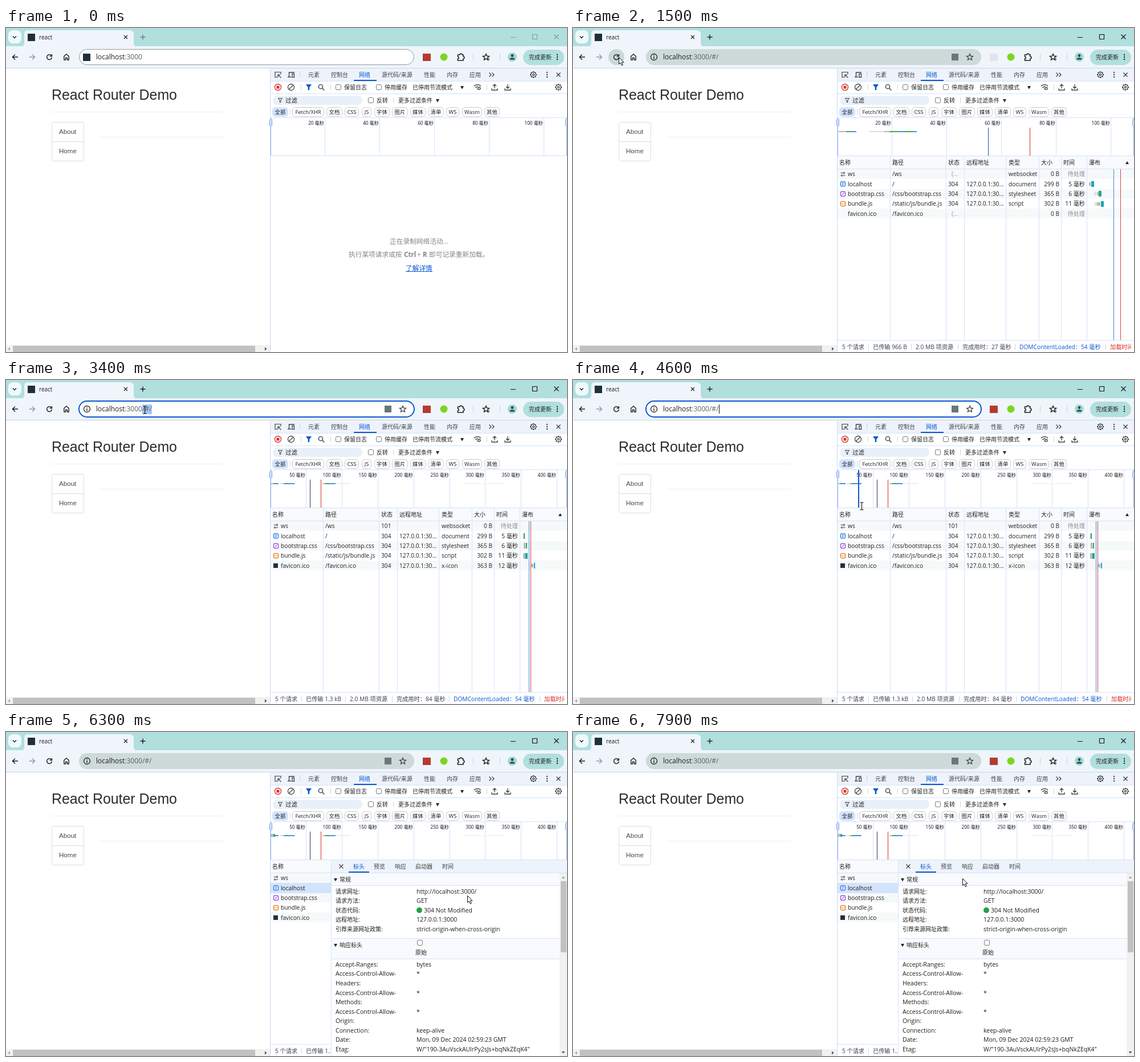
Write an HTML page with a canvas that moves like this. It is 984 px wide and 569 px high and loops after 8 s.

```html
<!DOCTYPE html>
<html lang="zh">
<head>
<meta charset="utf-8">
<style>
html, body { margin: 0; width: 100%; height: 100%; overflow: hidden; background: #fff; }
canvas { display: block; }
</style>
</head>
<body>
<canvas id="stage" width="984" height="569"></canvas>
<script>
const g = document.getElementById('stage').getContext('2d');
const UI = '"Open Sans", "Noto Sans CJK SC", sans-serif';
const INK = '#1f1f1f', ICON = '#3c4043', BLUE = '#0b57d0', GRID = '#d3e3fd', BAR = '#eff5fb', TEAL = '#b1dfdd', MARK = '#20303a';
const LOOP = 8000, STEP = 100;

function rect(x, y, w, h, color) { g.fillStyle = color; g.fillRect(x, y, w, h); }

function round(x, y, w, h, r, fill, stroke, lw = 1) {
  g.beginPath();
  g.roundRect(x, y, w, h, r);
  paint(fill, stroke, lw);
}

function circle(x, y, r, fill, stroke, lw = 1) {
  g.beginPath();
  g.arc(x, y, r, 0, 7);
  paint(fill, stroke, lw);
}

function paint(fill, stroke, lw) {
  if (fill) { g.fillStyle = fill; g.fill(); }
  if (stroke) { g.strokeStyle = stroke; g.lineWidth = lw; g.stroke(); }
}

// Text centred vertically on cy, with a whole-pixel baseline; returns its width.
function text(s, x, cy, size = 10, color = INK, { align = 'left', weight = 400, font = UI } = {}) {
  g.font = `${weight} ${size}px ${font}`;
  g.textAlign = align;
  g.fillStyle = color;
  g.fillText(s, x, Math.round(cy + size * 0.37));
  return g.measureText(s).width;
}

// SVG path drawn around (x, y).
function icon(d, x, y, stroke = ICON, lw = 1.3, fill) {
  const path = new Path2D(d);
  g.save();
  g.translate(x, y);
  g.lineWidth = lw;
  g.strokeStyle = stroke;
  g.fillStyle = fill;
  if (fill) g.fill(path);
  if (stroke) g.stroke(path);
  g.restore();
}

const CROSS = 'M-3.5-3.5L3.5 3.5M3.5-3.5L-3.5 3.5';
const FUNNEL = 'M-5-5H5L1.3 0V5H-1.3V0Z';
const STAR = 'M0-5.5L1.6-1.8L5.5-1.5L2.5 1.1L3.5 5L0 2.9L-3.5 5L-2.5 1.1L-5.5-1.5L-1.6-1.8Z';
const down = (x, y, s = 3, color = INK) => icon(`M${-s}${-s}H${s}L0 ${s * 0.8}Z`, x, y, null, 1, color);
const checkbox = (x, y) => round(x - 4.5, y - 4.5, 9, 9, 2, '#fff', '#767676');
const divider = (x, cy, h = 10) => rect(x, cy - h / 2, 1, h, '#c9d6e8');
const dots = (x, cy, color = ICON) => [-4, 0, 4].forEach(d => circle(x, cy + d, 1.2, color));

function gear(x, y) {
  circle(x, y, 4.4, null, ICON, 1.3);
  circle(x, y, 1.6, null, ICON, 1.2);
  for (let i = 0; i < 8; i++) {
    const c = Math.cos(i * Math.PI / 4), s = Math.sin(i * Math.PI / 4);
    icon(`M${c * 4.5} ${s * 4.5}L${c * 6} ${s * 6}`, x, y, ICON, 1.8);
  }
}

function drawBrowser(t) {
  const active = t >= 1300, reloaded = t >= 1400;
  const focused = (t >= 1300 && t < 1400) || (t >= 2800 && t < 5000);
  const ctrl = active ? '#111' : '#7e9c9c';

  rect(0, 0, 984, 33, TEAL);
  rect(0, 32, 984, 38, BAR);
  rect(0, 70, 984, 1, '#c8d8e4');
  round(4, 4, 23, 23, 8, '#f0f9fa');
  icon('M-3-1.5L0 1.5L3-1.5', 15, 16, INK, 1.5);
  icon('M25 33Q32 33 32 26V11Q32 4 39 4H217Q224 4 224 11V26Q224 33 231 33Z', 0, 0, null, 1, BAR);
  rect(38, 10, 13, 13, MARK);
  text('react', 58, 16);
  icon('M-3-3L3 3M3-3L-3 3', 210, 16, INK, 1.2);
  icon('M-4.5 0H4.5M0-4.5V4.5', 240, 16, active ? INK : '#66807f', 1.4);
  icon('M885 16.5H894M923.5 11.5H931.5V19.5H923.5ZM961.5 11.5L969.5 19.5M969.5 11.5L961.5 19.5', 0, 0, ctrl, 1.1);

  if (t >= 900 && t < 2000) circle(76, 51, 14, reloaded ? '#c9d8da' : '#dde9eb');
  icon('M5 0H-4M0-4.5L-4.5 0L0 4.5', 16, 51, INK, 1.5);
  icon('M-5 0H4M0-4.5L4.5 0L0 4.5', 46, 51, '#8c9a9d', 1.4);
  icon('M3.2-3A4.4 4.4 0 1 0 4.4.6M4.4-5V-1.5H.8', 76, 51, INK, 1.5);
  icon('M-4.2 5V-1.5L0-5L4.2-1.5V5H1.4V1.5H-1.4V5Z', 106, 51, INK, 1.4);

  if (focused) round(128, 37, 588, 28, 14, '#fff', BLUE, 2);
  else if (reloaded) round(128, 37, 588, 28, 14, '#ced9d9');
  else round(128.5, 37.5, 587, 27, 13.5, '#fff', '#8f9c9f');

  if (reloaded) {
    circle(142, 51, 5.5, null, INK, 1.3);
    rect(141.3, 50.3, 1.4, 4, INK);
    rect(141.3, 47.8, 1.4, 1.4, INK);
    rect(664, 45, 12, 12, '#68777a');
    icon(STAR, 696, 51, ICON, 1.3);
  } else rect(135, 45, 13, 13, MARK);

  const selecting = t >= 3000 && t < 4200;
  if (selecting) {
    const left = t < 3100 ? 251 : t < 3400 ? 243 : 239;
    rect(left, 43, 256 - left, 17, '#a8c7fa');
  }
  const host = text('localhost', 158, 51, 12);
  text(reloaded ? ':3000/#/' : ':3000', 158 + host, 51, 12, '#5a6366');
  if (focused && !selecting) rect(reloaded ? 256 : 239, 43, 1, 16, '#111');

  rect(731, 45, 14, 13, t >= 1400 && t < 1700 ? '#dfe5ea' : '#b63a31');
  circle(768, 51, 6.5, '#7fd321');
  icon('M-5.5-4H-2A2 2 0 0 1 2-4H4V-1A2 2 0 0 1 4 3V6H-5.5V2.8A1.8 1.8 0 0 0-5.5-.8Z', 798, 51, INK, 1.5);
  divider(819, 51, 12);
  icon(STAR, 842, 51, INK, 1.4);
  icon('M2 5H6M4 2.5H6', 842, 51, INK, 1.2);
  divider(866, 51, 12);
  circle(888, 51, 8, '#a9d5d5');
  circle(888, 48.5, 2.4, '#174f55');
  icon('M-4.5 4.5Q-4.5 1.2 0 1.2T4.5 4.5Z', 888, 51, null, 1, '#174f55');
  round(907, 38, 72, 27, 13.5, TEAL);
  text('完成更新', 917, 51.5, 10, INK, { weight: 500 });
  dots(967, 51, INK);
}

function drawPage() {
  const arial = { font: '"Liberation Sans", Arial, sans-serif' };
  rect(0, 71, 463, 498, '#fff');
  text('React Router Demo', 80, 117, 24.9, '#2b2b2b', arial);
  rect(80, 147, 301, 1, '#eee');
  rect(164, 191, 217, 1, '#eee');
  round(80.5, 165.5, 56, 68, 3, '#fff', '#ddd');
  rect(80, 199, 57, 1, '#ddd');
  text('About', 93, 182, 11.6, '#4a4a4a', arial);
  text('Home', 93, 216, 11.6, '#4a4a4a', arial);
  rect(0, 557, 463, 12, '#f1f1f1');
  rect(12, 558, 425, 11, '#c1c1c1');
  icon('M2-3V3L-1.5 0Z', 5, 563.5, null, 1, '#a3a3a3');
  icon('M-2-3V3L1.5 0Z', 456, 563.5, null, 1, '#505050');
}

function drawToolbars() {
  rect(463, 71, 521, 498, '#fff');
  rect(463, 71, 521, 22, '#eef3fb');
  for (const y of [93, 115, 157]) rect(463, y, 521, 1, GRID);

  icon('M5-1V-4.5H-5V4.5H-1M0 0L5.5 5.5M0 4.5V0H4.5', 477, 82, ICON, 1.2);
  icon('M-3.5 3V-4H6M-6 4H0M2-1.5H5.5V4.5H2Z', 500, 82, ICON, 1.3);
  divider(515, 82, 12);
  [['元素', 530], ['控制台', 570], ['网络', 619], ['源代码/来源', 659], ['性能', 733], ['内存', 773], ['应用', 813]]
    .forEach(([s, x]) => text(s, x, 82, 10, s === '网络' ? BLUE : ICON));
  rect(610, 91, 40, 2, BLUE);
  icon('M-4.5-3.5L-1 0L-4.5 3.5M.5-3.5L4 0L.5 3.5', 852, 82);
  gear(925, 82);
  dots(949, 82);
  icon(CROSS, 969, 82, ICON, 1.4);

  circle(477, 104, 5.5, null, '#dc362e', 1.4);
  rect(474.5, 101.5, 5, 5, '#dc362e');
  circle(500, 104, 5.5, null, ICON, 1.3);
  icon('M-4 4L4-4', 500, 104);
  icon(FUNNEL, 531, 104, null, 1, BLUE);
  circle(552, 103, 3.6, null, ICON, 1.4);
  icon('M2.5 2.5L6.5 6.5', 552, 103, ICON, 1.5);
  [517, 569, 843].forEach(x => divider(x, 104));
  checkbox(583, 104);
  text('保留日志', 593, 104.5);
  checkbox(654, 104);
  text('停用缓存', 664, 104.5);
  text('已停用节流模式', 713, 104.5);
  down(800, 105);
  icon('M-6-2Q0-7 6-2M-3.5 1Q-1-1.5 1-.8M-1 3L0 4', 827, 104, ICON, 1.4);
  circle(830, 106, 2, null, ICON, 1.3);
  icon('M0 2V-5M-3-2L0-5L3-2M-5 2V5H5V2', 857, 104);
  icon('M0-5V2M-3-1L0 2L3-1M-5 2V5H5V2', 880, 104);
  gear(969, 104);

  round(468, 119, 157, 16, 8, '#e9f0fa');
  icon('M-3.5-3.5H3.5L.8 0V3.5H-.8V0Z', 481, 127, ICON, 1);
  text('过滤', 490, 127.5, 10.5);
  checkbox(640, 127);
  text('反转', 650, 127.5);
  divider(679, 127);
  text('更多过滤条件', 688, 127.5);
  down(757, 128);

  const chips = [['全部', 467, 495], ['Fetch/XHR', 502, 558], ['文档', 562, 590], ['CSS', 594, 619], ['JS', 624, 641],
    ['字体', 646, 673], ['图片', 677, 705], ['媒体', 709, 736], ['清单', 740, 768], ['WS', 772, 795], ['Wasm', 800, 835], ['其他', 839, 866]];
  chips.forEach(([s, a, b], i) => {
    round(a + .5, 139.5, b - a - 1, 16, 5, i ? '#fff' : GRID, i ? '#c4c9d0' : GRID);
    text(s, (a + b) / 2, 147.5, 9.4, INK, { align: 'center' });
  });
  divider(498, 147);
}

const GREY = '#b9b9b9', PALE = '#e2e2e2', GREEN = '#34b04a', SKY = '#4a8df0', RED = '#d93025', NAVY = '#1a4fb4';

// Consecutive coloured bars: start, then [end, colour] pairs.
function bars(y, h, x, ...parts) {
  for (const [end, color] of parts) { rect(x, y, end - x, h, color); x = end; }
}

function drawOverview(t, phase, mouse) {
  const late = phase === 2, gap = late ? 62.9 : 96, unit = late ? 50 : 20;
  for (let k = 1; 464 + gap * k < 984; k++) {
    const x = Math.floor(463.5 + gap * k);
    rect(x, 158, 1, 66, GRID);
    text(`${unit * k} 毫秒`, x - 1, 167, 8.2, '#111', { align: 'right' });
  }
  if (phase === 1) {
    bars(181, 2, 466, [479, GREY], [488, GREEN], [497, SKY]);
    bars(181, 2, 519, [545, PALE], [555, GREY], [571, GREEN], [581, SKY], [594, GREEN], [603, SKY]);
    rect(728, 175, 1, 49, NAVY);
    rect(801, 175, 1, 49, RED);
  }
  if (late) {
    bars(181, 2, 465, [469, GREY], [472, GREEN], [478, SKY]);
    bars(181, 2, 480, [485, PALE], [488, GREY], [492, GREEN], [506, SKY]);
    bars(181, 2, 555, [560, GREY], [567, GREEN], [578, SKY], [604, '#f0f0f0']);
    rect(804, 181, 72, 2, '#f5f5f5');
    rect(533, 175, 1, 49, '#333064');
    rect(552, 175, 1, 49, RED);
    if (t >= 5100) bars(179, 5, 465, [469, GREY], [472, '#2fa38b']);
  }
  if (mouse && mouse[1] > 158 && mouse[1] < 224) rect(mouse[0] - 6, 158, 2, 66, BLUE);
  rect(464, 158, 1, 66, '#8ab0f0');
  rect(983, 158, 1, 66, '#8ab0f0');
  round(462.5, 159.5, 4, 13, 2, GRID, '#7aa7ee');
  round(981.5, 159.5, 4, 13, 2, GRID, '#7aa7ee');
  rect(463, 224, 521, 1, GRID);
}

function drawEmpty() {
  const grey = '#80868b';
  text('正在录制网络活动...', 673, 375, 11.7, grey);
  text('执行某项请求或按', 601, 398, 11.7, grey);
  text('Ctrl', 698, 398, 11.7, grey, { weight: 700 });
  text('+', 721, 398, 11.7, grey);
  text('R', 731, 398, 11.7, grey, { weight: 700 });
  text('即可记录重新加载。', 742, 398, 11.7, grey);
  text('了解详情', 701, 421.5, 11.7, BLUE);
  rect(701, 427, 47, 1, BLUE);
}

const rowY = i => 256.5 + 17.4 * i;

function drawTable(phase, open) {
  const late = phase === 2, right = open ? 570 : 984, pending = '#8a8f94';
  rect(464, 225, right - 464, 22, '#f8fafd');
  for (let i = 0; i < 5; i += 2) rect(464, Math.round(rowY(i) - 8.7), right - 464, 17, '#f6f9fa');
  if (open) rect(464, 265, 106, 18, GRID);
  rect(463, 247, right - 463, 1, GRID);

  text('名称', 467, 236);
  ['ws', 'localhost', 'bootstrap.css', 'bundle.js', 'favicon.ico'].forEach((s, i) => text(s, 482, rowY(i), 10.2));
  icon('M-4-2H3M1-4L3.5-2L1 0M4 2.5H-3M-1 .5L-3.5 2.5L-1 4.5', 473.5, 256.5, ICON, 1);
  ['#1a73e8', '#9334e6', '#e8710a'].forEach((c, i) => round(469.5, rowY(i + 1) - 4, 8, 8, 1.5, '#fff', c, 1.2));
  icon('M-2-1.5H2M-2 .5H2M-2 2.3H1', 473.5, 273.5, '#1a73e8', .9);
  icon('M-2 2L2-2', 473.5, 291.3, '#9334e6', 1.1);
  icon('M-.8-1.8L-2.4 0L-.8 1.8M.8-1.8L2.4 0L.8 1.8', 473.5, 308.7, '#e8710a', 1);
  if (late) rect(469, 322, 8, 8, MARK);

  if (!open) {
    [['路径', 560], ['状态', 658], ['远程地址', 690], ['类型', 764], ['大小', 821], ['时间', 860], ['瀑布', 905]]
      .forEach(([s, x]) => text(s, x, 236));
    icon('M-3 2.5H3L0-2.5Z', 972, 236.5, null, 1, INK);
    const rows = [
      ['/ws', late && '101', '', 'websocket', '0 B'],
      ['/', '304', '127.0.0.1:30...', 'document', '299 B', '5 毫秒'],
      ['/css/bootstrap.css', '304', '127.0.0.1:30...', 'stylesheet', '365 B', '6 毫秒'],
      ['/static/js/bundle.js', '304', '127.0.0.1:30...', 'script', '302 B', '11 毫秒'],
      late ? ['/favicon.ico', '304', '127.0.0.1:30...', 'x-icon', '363 B', '12 毫秒'] : ['/favicon.ico', '', '', '', '0 B'],
    ];
    rows.forEach(([path, status, address, type, size, time], i) => {
      const y = rowY(i);
      text(path, 560, y, 10.2);
      status ? text(status, 658, y, 10.2) : text('(...', 664, y, 10.2, pending);
      text(address, 690, y, 10.2);
      text(type, 764, y, 10.2);
      text(size, 853, y, 10.2, INK, { align: 'right' });
      text(time || '待处理', 898, y, 10.2, time ? INK : pending, { align: 'right' });
    });
    [556, 654, 686, 759, 817, 856, 901].forEach(x => rect(x, 225, 1, 323, GRID));

    const cyan = '#12a5d6', jade = '#26ab6c';
    if (late) {
      bars(269, 10, 906, [908, PALE], [910, jade]);
      bars(286, 10, 908, [911, GREY], [912, PALE], [914, jade]);
      bars(304, 10, 907, [911, GREY], [913, jade], [915, cyan]);
      bars(323, 6, 921, [925, GREY]);
      bars(321, 10, 926, [928, cyan]);
    } else {
      bars(271, 6, 905, [908, GREY]);
      bars(269, 10, 909, [911, jade], [914, cyan]);
      bars(288, 6, 914, [920, PALE], [922, GREY]);
      bars(286, 10, 922, [925, jade], [927, cyan]);
      bars(306, 6, 914, [919, PALE], [925, GREY]);
      bars(304, 10, 926, [928, jade], [931, cyan]);
    }
    rect(late ? 917 : 948, 248, 1, 300, '#4a80d4');
    rect(late ? 920 : 960, 248, 1, 300, '#d2453f');
  }

  // Summary bar, clipped to the visible width.
  const shift = late ? 2 : 0;
  g.save();
  g.beginPath();
  g.rect(463, 548, (open ? 569 : 979) - 463, 21);
  g.clip();
  rect(463, 548, 521, 21, '#fff');
  rect(463, 548, 521, 1, GRID);
  [['5 个请求', 472], [`已传输 ${late ? '1.3 kB' : '966 B'}`, 526], ['2.0 MB 项资源', 601 + shift],
    [`完成用时：${late ? 84 : 27} 毫秒`, 683 + shift], ['DOMContentLoaded：54 毫秒', 783 + shift, BLUE], ['加载时间：', 942 + shift, RED]]
    .forEach(([s, x, color = ICON], i) => {
      text(s, x, 560, 10.2, color);
      if (i) divider(x - 8, 560);
    });
  g.restore();
  if (!open) rect(979, 548, 5, 1, GRID);
}

function drawDetails() {
  rect(570, 225, 414, 344, '#fff');
  rect(570, 225, 1, 344, GRID);
  rect(571, 225, 413, 22, '#eef3fb');
  rect(571, 247, 413, 1, GRID);
  icon(CROSS, 588, 236, ICON, 1.3);
  [['标头', 609], ['预览', 645], ['响应', 682], ['启动器', 718], ['时间', 765]]
    .forEach(([s, x], i) => text(s, x, 236, 10, i ? ICON : BLUE));
  rect(601, 245, 36, 2, BLUE);

  rect(571, 248, 400, 21, '#f8fafd');
  rect(571, 363, 400, 35, '#f8fafd');
  for (const y of [269, 362, 398]) rect(571, y, 400, 1, GRID);
  down(578, 260);
  text('常规', 585, 259);
  down(578, 375);
  text('响应标头', 585, 374);
  checkbox(726, 370);
  text('原始', 718, 387);

  [['请求网址:', 'http://localhost:3000/'], ['请求方法:', 'GET'], ['状态代码:', '304 Not Modified'],
    ['远程地址:', '127.0.0.1:3000'], ['引荐来源网址政策:', 'strict-origin-when-cross-origin']].forEach(([key, value], i) => {
    const y = 280 + 16.5 * i;
    text(key, 578, y);
    text(value, i === 2 ? 733 : 720, y, 10.5);
  });
  circle(725, 313, 5, '#1ea446');

  [['Accept-Ranges:', 'bytes'], ['Access-Control-Allow-', '*'], ['Headers:'], ['Access-Control-Allow-', '*'], ['Methods:'],
    ['Access-Control-Allow-', '*'], ['Origin:'], ['Connection:', 'keep-alive'], ['Date:', 'Mon, 09 Dec 2024 02:59:23 GMT'],
    ['Etag:', 'W/"190-3AuVsckAUlrPy2sJs+bqNkZEqK4"']].forEach(([key, value = ''], i) => {
    const y = 408 + 16.57 * i;
    text(key, 578, y, 10.6);
    text(value, 720, y, 10.5);
  });

  rect(971, 248, 13, 321, '#f1f1f1');
  rect(973, 262, 10, 125, '#c1c1c1');
  icon('M-3 2H3L0-1.5Z', 977.5, 255, null, 1, '#a3a3a3');
  icon('M-3-2H3L0 1.5Z', 977.5, 563, null, 1, '#505050');
}

// Pointer way-points: time, x, y.
const PATH = [[100, 900, 52], [500, 330, 55], [900, 80, 51], [1800, 80, 51], [2000, 121, 78], [2100, 185, 98], [2200, 240, 104],
  [2300, 289, 94], [2400, 287, 78], [2500, 282, 58], [2600, 270, 52], [3000, 248, 52], [3200, 244, 52], [3500, 242, 52],
  [3700, 242, 52], [4000, 300, 52], [4300, 300, 52], [4400, 322, 75], [4600, 506, 221], [4900, 498, 271], [5400, 498, 271],
  [6300, 809, 287], [6700, 827, 283], [6800, 827, 283], [7700, 737, 280], [7900, 683, 257]];

function pointerAt(t) {
  if (t < PATH[0][0]) return null;
  const i = PATH.findIndex(p => p[0] > t);
  if (i < 0) return PATH[PATH.length - 1].slice(1);
  const [t0, x0, y0] = PATH[i - 1], [t1, x1, y1] = PATH[i];
  const k = (t - t0) / (t1 - t0);
  return [Math.round(x0 + (x1 - x0) * k), Math.round(y0 + (y1 - y0) * k)];
}

function drawPointer([x, y]) {
  const inAddress = x > 150 && x < 655 && y > 38 && y < 66;
  const inOverview = x > 463 && y > 158 && y < 224;
  if (inAddress || inOverview) icon('M-3-6.5H-1L0-5.5L1-6.5H3M0-5.5V5.5M-3 6.5H-1L0 5.5L1 6.5H3', x + .5, y + .5, '#111', 1.1);
  else icon('M.5.5V12.5L3.2 10L5.3 14.8L7.3 13.9L5.3 9.2H9Z', x, y, '#111', 1, '#fff');
}

function render(t) {
  const phase = t < 1500 ? 0 : t < 1800 ? 1 : 2;
  const open = t >= 5100;
  const mouse = pointerAt(t);
  drawBrowser(t);
  drawPage();
  drawToolbars();
  drawOverview(t, phase, mouse);
  if (phase) drawTable(phase, open);
  else drawEmpty();
  if (open) drawDetails();
  rect(463, 71, 1, 498, '#c9dcf5');
  if (mouse) drawPointer(mouse);
}

function tick() {
  const t = performance.now() % LOOP;
  render(Math.floor(t / STEP) * STEP);
  requestAnimationFrame(tick);
}
tick();
</script>
</body>
</html>
```
